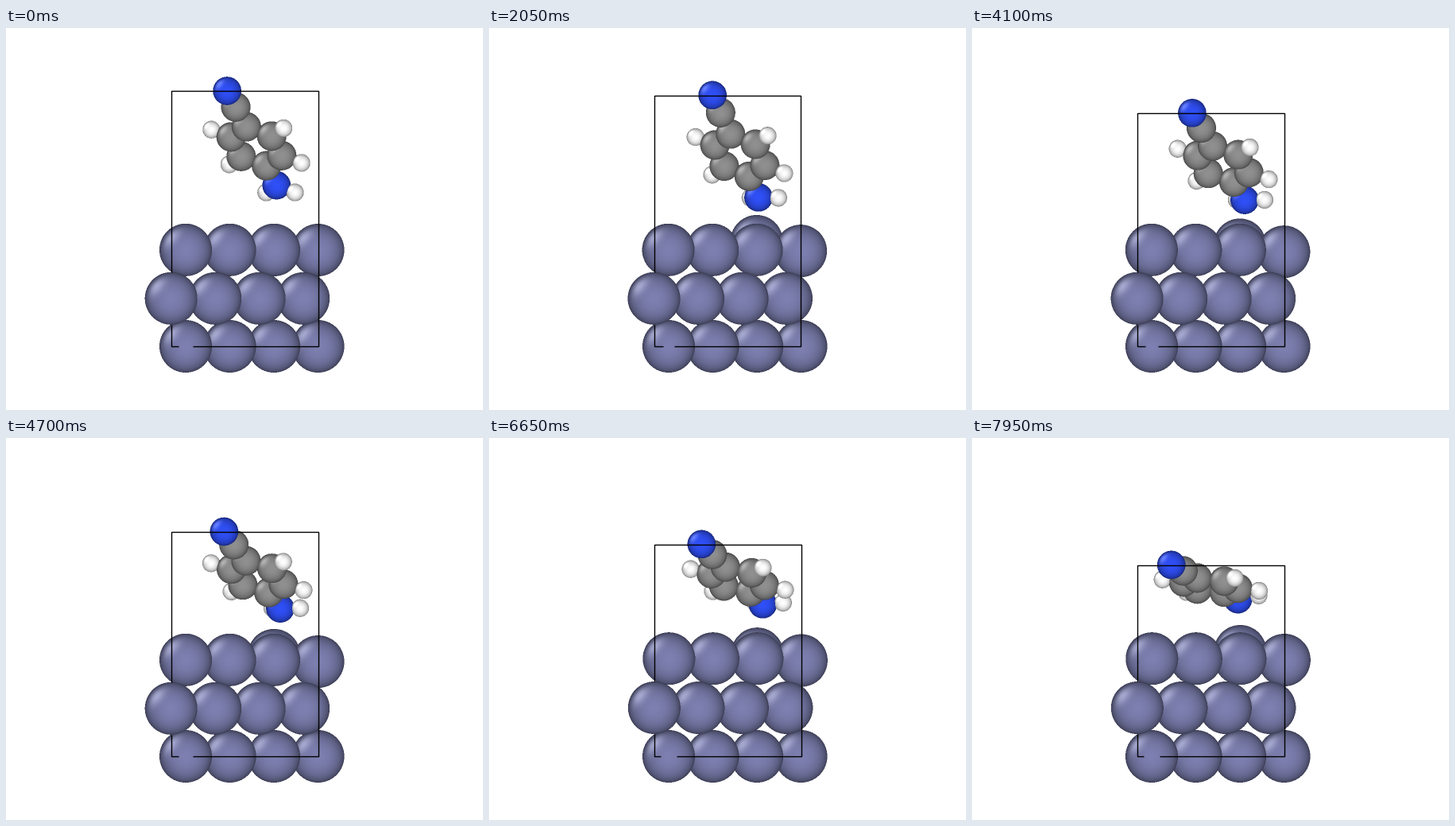
These frames come from a looping animation (600x480 px, 8 s). A matplotlib script:

```python
import numpy as np
import matplotlib.pyplot as plt
from matplotlib.animation import FuncAnimation

W, H, STEP, FRAMES = 600, 480, 50, 160
SCALE = 24.1                         # pixels per angstrom
X0, Y0, X1, Y1 = 160, 50, 440, 446   # region holding all the atoms
SS = 2                               # supersampling

ZN = (33.0, np.array([125, 128, 176]) / 255)
C = (18.5, np.array([144, 144, 144]) / 255)
N = (17.8, np.array([48, 80, 248]) / 255)
HY = (11.1, np.ones(3))

LIGHT = np.array([-1.8, 1.5, -0.2])
LIGHT = LIGHT / np.linalg.norm(LIGHT)


def ramp(t, start, end):
    return min(max((t - start) / (end - start), 0), 1)


def ease(t, start, end):
    s = ramp(t, start, end)
    return s * s * (3 - 2 * s)


def slab_pose(t):
    """Sideways drift and heights of the middle and top layers."""
    drift = -0.4 * np.sin(2 * np.pi * t / 9.4)
    lift = 1.6 * ease(t, 5.5, 6.6)
    return drift, 339.8 - lift / 2, 278.8 - lift


def slab_atoms(t):
    drift, mid, top = slab_pose(t)
    last = 279 + 2.2 * np.sin(np.pi * t / 8) ** 2
    raised = 279 - 11 * ease(t, 0, 2) + 5 * np.sin(np.pi * ramp(t, 2.05, 7.95))
    atoms = [(ZN, (337.1 + drift, raised, -160))]
    for i in range(4):
        dx, z = 55.5 * i, -32 * i
        atoms.append((ZN, (226 + dx, 400, z - 32)))
        atoms.append((ZN, (207.7 + dx + drift / 2, mid, z)))
        atoms.append((ZN, (226 + dx + drift, last if i == 3 else top, z - 32)))
    return atoms


def molecule_pose(t):
    """Centre of the ring and its long axis, which sinks and tips over."""
    cx = 315 + 0.25 * min(t, 5.25) - 16 * ramp(t, 5.25, 7.95) ** 2.4
    cy = 148.6 + 5.45 * min(t, 5.25) + 7.6 * ramp(t, 6.2, 7.95) ** 2
    ay = (49 + 2 * min(t, 2.1) - 18 * ramp(t, 2.1, 5.15) ** 1.9
          - 17.6 * ease(t, 6, 8.1))
    ax = 35.6 - 0.0043 * ay * ay
    az = -np.sqrt((2.8 * SCALE) ** 2 - ax * ax - ay * ay)
    return np.array([cx, cy, -100]), np.array([ax, ay, az])


def molecule_atoms(t):
    mid, a = molecule_pose(t)
    b = np.array([51, -1, 0.0])
    b[2] = -(a @ b) / a[2]           # keeps the ring's two axes square

    c1, c4 = mid - a / 2, mid + a / 2
    n1 = mid - 1.42 * a - (1, 0, 0)
    n2 = mid + a
    atoms = [(C, c1), (C, c4), (C, c1 + 0.55 * (n1 - c1)), (N, n1), (N, n2)]
    for u in (-0.25, 0.25):
        for v in (-0.5, 0.5):
            arm = u * a + v * b
            atoms += [(C, mid + arm), (HY, mid + 1.78 * arm)]

    drop = 9 * np.exp(-t / 0.7) - 5 * (t / 8) ** 5
    atoms.append((HY, n2 + (-10 - drop / 3, drop, -18)))
    atoms.append((HY, n2 + (25 - 0.2 * drop, drop, 4)))
    return atoms, n1


def draw_ball(img, depth, kind, pos):
    radius, color = kind
    r = radius * SS
    x, y, z = (pos[0] - X0) * SS, (pos[1] - Y0) * SS, pos[2] * SS
    left, right = max(int(x - r), 0), min(int(x + r) + 2, img.shape[1])
    low, high = max(int(y - r), 0), min(int(y + r) + 2, img.shape[0])
    nx = ((np.arange(left, right) + 0.5 - x) / r)[None, :]
    ny = (-(np.arange(low, high) + 0.5 - y) / r)[:, None]
    q = 1 - nx * nx - ny * ny
    nz = np.sqrt(np.maximum(q, 0))
    front = z + r * nz
    zone = depth[low:high, left:right]
    hit = (q > 0) & (front > zone)
    zone[hit] = front[hit]

    facing = LIGHT[0] * nx + LIGHT[1] * ny + LIGHT[2] * nz
    shine = np.maximum(2 * facing * nz - LIGHT[2], 0)
    shine = 0.25 * (shine * shine * shine) ** 2
    shade = (0.4 + 0.6 * nz)[hit][:, None] * color + shine[hit][:, None]
    img[low:high, left:right][hit] = np.minimum(shade, 1)


def render(atoms):
    shape = ((Y1 - Y0) * SS, (X1 - X0) * SS)
    img = np.ones(shape + (3,), np.float32)
    depth = np.full(shape, -1e6, np.float32)
    for kind, pos in atoms:
        draw_ball(img, depth, kind, pos)
    return sum(img[i::SS, j::SS] for i in range(SS) for j in range(SS)) / SS ** 2


fig = plt.figure(figsize=(W / 100, H / 100), dpi=100, facecolor="white")
ax = fig.add_axes([0, 0, 1, 1])
ax.axis("off")
picture = ax.imshow(np.ones((Y1 - Y0, X1 - X0, 3)), extent=(X0, X1, Y1, Y0),
                    interpolation="nearest", aspect="auto")
ax.set_xlim(0, W)
ax.set_ylim(H, 0)
cell, = ax.plot([], [], color="black", lw=1, solid_capstyle="butt",
                solid_joinstyle="miter")


def update(n):
    t = n * STEP / 1000
    molecule, tip = molecule_atoms(t)
    picture.set_data(render(slab_atoms(t) + molecule))

    # The cell outline is hidden where the nearest atoms bulge past it.
    drift, mid, _ = slab_pose(t)
    left, right, top, bottom = 208.1 + drift, 392.85 + drift, tip[1] + 0.3, 400.4
    gap = min(10, 9 + 6 * drift)
    nan = np.nan
    cell.set_data(
        [left, left, nan, 226 - gap, left, left, nan,
         226 + gap, right, right, left],
        [top, mid - 33, nan, bottom, bottom, mid + 33, nan,
         bottom, bottom, top, top])
    return picture, cell


anim = FuncAnimation(fig, update, frames=FRAMES, interval=STEP,
                     repeat=True, repeat_delay=0, blit=False)
plt.show()
```
